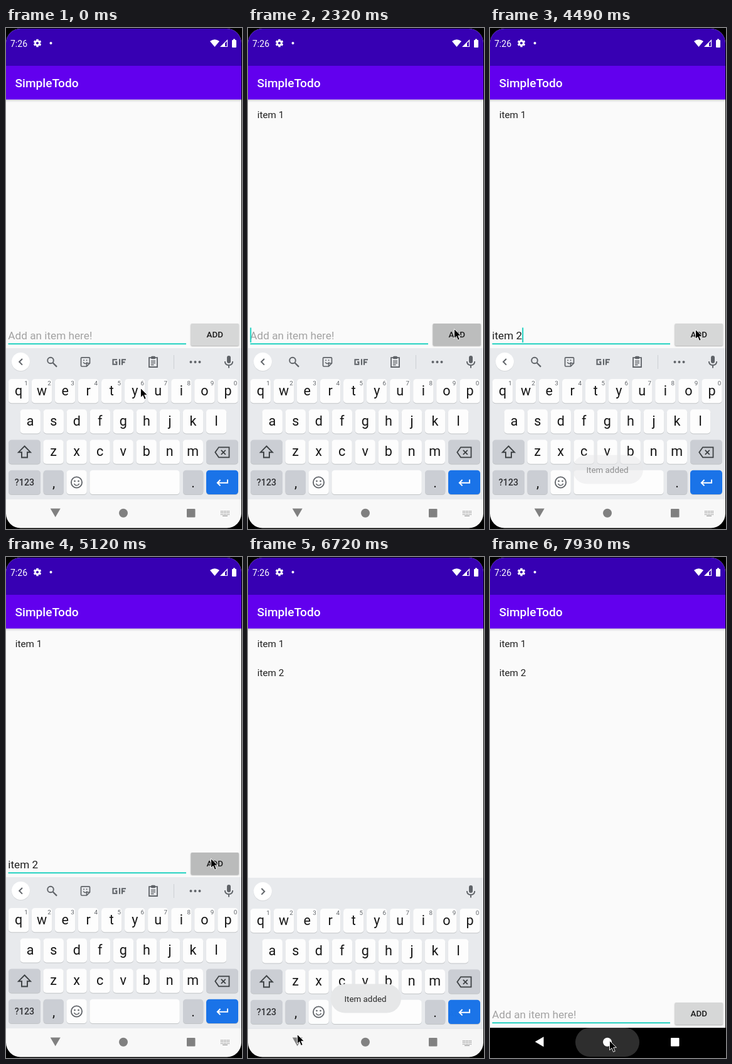
These frames come from a looping animation (376x795 px, 7.99 s). An HTML page with a canvas:

```html
<!DOCTYPE html>
<html lang="en">
<head>
<meta charset="utf-8">
<title>Todo list</title>
<style>
html, body { margin: 0; width: 100%; height: 100%; overflow: hidden; background: #000; }
canvas { display: block; }
</style>
</head>
<body>
<canvas id="stage" width="376" height="795"></canvas>
<script>
const W = 376, H = 795, LOOP = 7990, HIDE = 6720;
const screen = document.getElementById('stage').getContext('2d');
const layer = document.createElement('canvas');
layer.width = W;
layer.height = H;
const keys = layer.getContext('2d');

const TEAL = '#1fd1c0', ICON = '#5f6368';
const TOOLS = null, BLANK = ['', '', ''];
const S_I = ['i', 'I', "I'm"], S_IT = ['it', 'It', "it's"], S_ITE = ['ite', 'item', 'its'];
const S_ITEM = ['item', 'items', 'itemized'], S_NEXT = ['is', 'I', 'for'];

// time, field text, suggestion strip
const TYPING = [
  [0, '', TOOLS], [250, 'i', TOOLS], [370, 'i', S_I], [490, 'it', S_I], [610, 'it', S_IT],
  [860, 'ite', S_ITE], [1060, 'item', S_ITE], [1180, 'item', S_ITEM],
  [1430, 'item 1', S_NEXT], [1550, 'item 1', TOOLS], [2260, '', TOOLS],
  [3230, 'i', TOOLS], [3350, 'i', S_I], [3470, 'it', S_I], [3590, 'it', S_IT],
  [3710, 'ite', S_ITE], [3960, 'item', S_ITE], [4080, 'item', S_ITEM],
  [4260, 'item ', S_NEXT], [4380, 'item 2', S_NEXT], [4480, 'item 2', TOOLS],
  [5130, '', TOOLS], [HIDE, '', BLANK]
];

// time, x, y of the pointer tip
const POINTER = [
  [0, 214, 571], [1400, 214, 571], [1430, 139, 535], [1550, 220, 492], [1660, 306, 456],
  [1730, 325, 469], [1900, 325, 469], [2020, 328, 477], [4260, 328, 477], [4320, 327, 478],
  [4500, 327, 478], [4640, 312, 427], [4820, 326, 478], [5260, 326, 478], [5400, 318, 434],
  [5520, 270, 352], [5630, 239, 327], [5840, 239, 327], [5890, 220, 371], [6100, 186, 480],
  [6400, 112, 672], [6600, 80, 748], [6660, 78, 757], [6960, 78, 757], [7200, 124, 764],
  [7500, 187, 768], [7560, 190, 767], [LOOP, 190, 767]
];

const clamp = v => Math.max(0, Math.min(1, v));
const ramp = (t, a, b) => clamp((t - a) / (b - a));

function text(g, s, x, y, size, color, align = 'left', weight = 400) {
  g.font = `${weight} ${size}px Roboto, "Open Sans", sans-serif`;
  g.textAlign = align;
  g.fillStyle = color;
  g.fillText(s, x, y);
}

function rect(g, x, y, w, h, color, r = 0) {
  g.fillStyle = color;
  g.beginPath();
  g.roundRect(x, y, w, h, r);
  g.fill();
}

function disc(g, x, y, r, color) {
  g.fillStyle = color;
  g.beginPath();
  g.arc(x, y, r, 0, 7);
  g.fill();
}

function line(g, d, color, width = 2) {
  g.strokeStyle = color;
  g.lineWidth = width;
  g.stroke(new Path2D(d));
}

function shape(g, d, color) {
  g.fillStyle = color;
  g.fill(new Path2D(d));
}

function ring(g, x, y, r, color, width) {
  g.strokeStyle = color;
  g.lineWidth = width;
  g.beginPath();
  g.arc(x, y, r, 0, 7);
  g.stroke();
}

function smiley(g, x, y, k, color) {
  disc(g, x - 3 * k, y - 2 * k, 1.3 * k, color);
  disc(g, x + 3 * k, y - 2 * k, 1.3 * k, color);
  g.strokeStyle = color;
  g.lineWidth = 1.5;
  g.beginPath();
  g.arc(x, y + 0.5 * k, 4.3 * k, 0.35, Math.PI - 0.35);
  g.stroke();
}

function statusBar(g) {
  rect(g, 0, 0, W, 60, '#3700b3');
  text(g, '7:26', 7, 29.5, 14, '#fff');
  for (let i = 0; i < 6; i++) {
    g.save();
    g.translate(50, 24);
    g.rotate(i * Math.PI / 3);
    rect(g, -1.7, -6.3, 3.4, 4, '#fff', 0.5);
    g.restore();
  }
  ring(g, 50, 24, 3.4, '#fff', 2.6);
  disc(g, 71.5, 24, 2, '#fff');
  shape(g, 'M332.5 30L325 21Q332.5 15.5 340 21Z', '#fff');
  line(g, 'M342.5 29.5H352.5V19.5Z', '#fff', 1.2);
  shape(g, 'M341.5 30L349 22.5V30Z', '#fff');
  rect(g, 360, 19, 7, 12, '#fff', 1);
  rect(g, 362, 17.5, 3, 2, '#fff');
}

function appBar(g) {
  const shade = g.createLinearGradient(0, 113, 0, 118);
  shade.addColorStop(0, 'rgba(0,0,0,.16)');
  shade.addColorStop(1, 'rgba(0,0,0,0)');
  rect(g, 0, 113, W, 5, shade);
  rect(g, 0, 60, W, 53.4, '#6200ee');
  text(g, 'SimpleTodo', 14.5, 94.3, 19.1, '#fff', 'left', 500);
}

function form(g, t, value, strip, age) {
  const dy = t >= HIDE ? 238 : 0;
  g.save();
  g.translate(0, dy);
  rect(g, 3.5, 500.3, 283.5, 2, TEAL);
  if (value) text(g, value, 3.3, 493.8, 17.2, '#202020');
  else text(g, 'Add an item here!', 3.3, 493.8, 17.2, '#a3a3a3');
  const width = g.measureText(value).width;
  if (value && strip && value.startsWith(strip[0])) {
    rect(g, 3.5, 495.5, g.measureText(strip[0]).width, 1, '#202020');
  }
  if (t > 250 && t < HIDE && age % 1000 < 500) rect(g, 3.3 + width, 475.5, 2, 23.5, TEAL);

  g.shadowColor = 'rgba(0,0,0,.3)';
  g.shadowBlur = 2;
  g.shadowOffsetY = 1;
  rect(g, 294.5, 469, 76.5, 35, '#d6d7d7', 2);
  g.shadowColor = 'transparent';
  for (const at of [2200, 5070]) {
    if (t >= at) rect(g, 294.5, 469, 76.5, 35, `rgba(0,0,0,${0.13 * (1 - ramp(t, at + 100, at + 420))})`, 2);
  }
  text(g, 'ADD', 332.7, 491.3, 13.4, '#1c1c1c', 'center', 500);
  g.restore();
}

function suggestions(g, strip) {
  disc(g, 23.5, 530.3, 14.7, 'rgba(0,0,0,.08)');
  disc(g, 23.5, 529.6, 14.5, '#fff');
  if (strip) {
    line(g, 'M21.5 525L26.3 529.8L21.5 534.6', ICON);
    if (strip[0]) {
      [83.5, 186, 288.5].forEach((x, i) => text(g, strip[i], x, 536.5, 17, i === 1 ? '#3c4043' : ICON, 'center'));
      for (const x of [132, 240]) rect(g, x, 519, 1, 22, '#c4c7cb');
    }
  } else {
    line(g, 'M26 525L21.2 529.8L26 534.6', ICON);
    ring(g, 71, 527.5, 4.8, ICON, 1.9);
    line(g, 'M74.6 531.2L81 537.6', ICON, 2.2);
    line(g, 'M121 522.8H132Q133.5 522.8 133.5 524.3V532L128.5 537H121Q119.5 537 119.5 535.5V524.3Q119.5 522.8 121 522.8ZM133.5 532H128.5V537', ICON, 1.7);
    smiley(g, 126.3, 528.8, 0.75, ICON);
    line(g, 'M177 526.3H170.5V533.7H176.3V530H174M181 525.3V534.7M185 534.7V526.3H191M185 530.4H189.5', ICON, 2.1);
    line(g, 'M228 523.2H241V538H228Z', ICON, 1.8);
    rect(g, 231, 520.7, 7, 4.5, ICON, 1.5);
    line(g, 'M231 528.5H238M231 531.5H238M231 534.5H235.5', ICON, 1.4);
    rect(g, 267, 519, 1, 22, '#cdd0d4');
    for (const x of [294.5, 301.5, 308.5]) disc(g, x, 530, 2, ICON);
  }
  rect(g, 352, 520, 6, 12, ICON, 3);
  line(g, 'M348.8 529Q349 535 355 535Q361 535 361.2 529M355 535V539.5', ICON, 1.9);
}

function key(g, x, y, w, color = '#fdfdfd') {
  rect(g, x, y + 1, w, 38.3, 'rgba(60,64,67,.22)', 5);
  rect(g, x, y, w, 38.3, color, 5);
}

function keyboard(g, strip) {
  const grey = '#cbced4', dark = '#161616', step = 37.05;
  g.clearRect(0, 0, W, H);
  rect(g, 0, 508, W, H - 508, '#e8eaed');
  suggestions(g, strip);

  const rows = [['qwertyuiop', 20, 557], ['asdfghjkl', 38.7, 605.2], ['zxcvbnm', 75.5, 653.5]];
  for (const [letters, x0, y] of rows) {
    [...letters].forEach((c, i) => {
      const x = x0 + i * step;
      key(g, x - 16.2, y, 32.4);
      text(g, c, x, y + 25.7, 21.5, dark, 'center');
      if (y === 557) text(g, (i + 1) % 10, x + 12, y + 10.3, 9.8, ICON, 'center');
    });
  }

  key(g, 4, 653.5, 51, grey);
  line(g, 'M29.5 663.5L39 673.2H34V681.5H25V673.2H20Z', '#3c4043', 1.9);
  key(g, 319, 653.5, 51, grey);
  line(g, 'M339 665.3H355.5V681.3H339L333.3 673.3ZM342.8 669.8L349.8 676.8M349.8 669.8L342.8 676.8', '#3c4043', 1.8);

  key(g, 4, 701.8, 51, grey);
  text(g, '?123', 29.5, 726.3, 14.3, '#303134', 'center', 500);
  key(g, 59.5, 701.8, 32.4, grey);
  text(g, ',', 76, 728.5, 21.5, dark, 'center');
  key(g, 96.4, 701.8, 32.4);
  ring(g, 112.5, 721, 8.6, ICON, 1.8);
  smiley(g, 112.5, 721, 1, ICON);
  key(g, 133.3, 701.8, 143.5);
  key(g, 282, 701.8, 32.4, grey);
  text(g, '.', 298, 728.5, 21.5, dark, 'center');
  key(g, 319, 701.8, 51, '#1a73e8');
  line(g, 'M353 716.5V721.7H337M341.5 717L336.8 721.7L341.5 726.4', '#fff', 2);

  rect(g, 0, 748, W, 47, '#f8f8f8');
  for (let r = 0; r < 3; r++) {
    for (let c = 0; c < 6; c++) rect(g, 342 + c * 2.5, 766 + r * 2.6, 1.5, 1.5, '#a0a0a0');
  }
  rect(g, 345, 773.6, 8, 1.3, '#a0a0a0');
}

function navIcons(g, t) {
  const p = ramp(t, HIDE, 6870);
  const v = Math.round(128 + 127 * p);
  const color = `rgb(${v},${v},${v})`;
  g.save();
  g.translate(78.7, 769.3);
  g.rotate(p * Math.PI / 2);
  shape(g, 'M-8 -6.8H8L0 7Z', color);
  g.restore();
  disc(g, 187, 769.7, 7, color);
  rect(g, 288, 763, 13.5, 13.5, color, 1);
}

function toast(g, t) {
  const show = at => ramp(t, at, at + 240) * (1 - ramp(t, at + 2060, at + 2280));
  g.globalAlpha = Math.max(show(2320), show(5190));
  if (g.globalAlpha > 0 && (t > 2320)) {
    rect(g, 131.5, 677.5, 112.5, 46, '#e6e7e8', 23);
    text(g, 'Item added', 187, 706, 13.4, '#2b2b2b', 'center');
  }
  g.globalAlpha = 1;
}

function pointer(g, t) {
  const i = Math.max(1, POINTER.findIndex(k => k[0] > t));
  const [t0, x0, y0] = POINTER[i - 1], [t1, x1, y1] = POINTER[i];
  const p = ramp(t, t0, t1);
  g.save();
  g.translate(x0 + (x1 - x0) * p, y0 + (y1 - y0) * p);
  const arrow = 'M0.5 0.5V15.5L4 12.2L6.5 18.3L9.2 17.2L6.7 11.3H11.4Z';
  shape(g, arrow, '#000');
  line(g, arrow, '#fff', 0.9);
  g.restore();
}

function draw(t) {
  const g = screen;
  let now = TYPING[0], changed = -500;
  for (const step of TYPING) {
    if (step[0] > t) break;
    if (step[1] !== now[1]) changed = step[0];
    now = step;
  }
  const [, value, strip] = now;

  rect(g, 0, 0, W, H, '#000');
  g.save();
  g.beginPath();
  g.roundRect(0, 1, 375, 792.5, 23);
  g.clip();
  rect(g, 0, 0, W, 747, '#fafafa');
  statusBar(g);
  appBar(g);
  if (t >= 2320) text(g, 'item 1', 14.7, 142.5, 15.3, '#212121');
  if (t >= 5190) text(g, 'item 2', 14.7, 188.5, 15.3, '#212121');
  form(g, t, value, strip, t - changed);

  const alpha = 1 - ramp(t, HIDE, HIDE + 165);
  if (alpha > 0) {
    keyboard(keys, strip);
    g.globalAlpha = alpha;
    g.drawImage(layer, 0, Math.max(0, t - HIDE));
    g.globalAlpha = 1;
  }
  if (t >= 7780) rect(g, 136, 747, 102, 46, `rgba(255,255,255,${0.18 * ramp(t, 7780, 7900)})`, 23);
  navIcons(g, t);
  toast(g, t);
  pointer(g, t);
  g.restore();
}

const start = performance.now();
function frame() {
  draw((performance.now() - start) % LOOP);
  requestAnimationFrame(frame);
}
frame();
</script>
</body>
</html>
```
